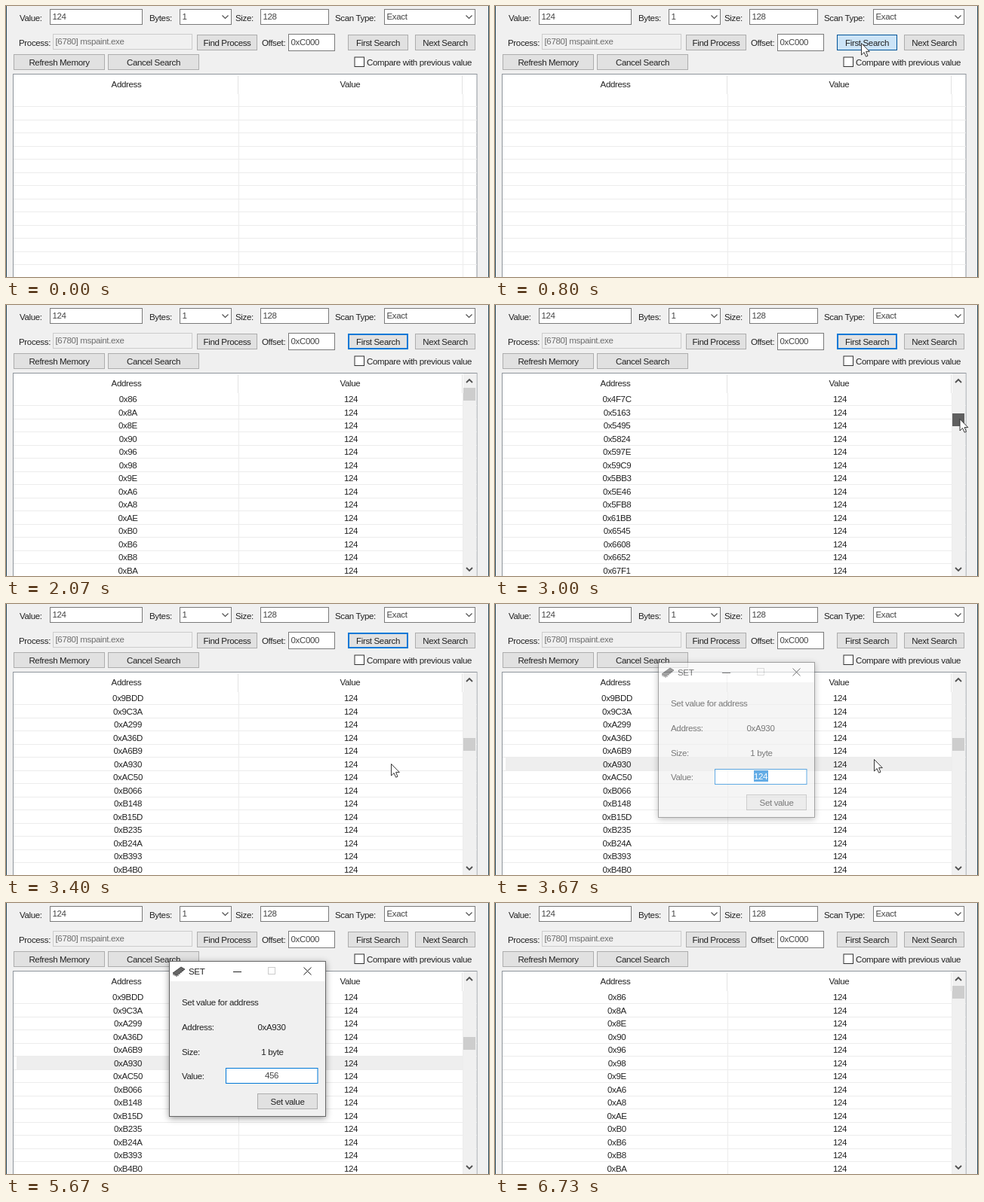
These frames come from a looping animation (640 by 360 pixels, 7.54 s). An HTML page:

```html
<!DOCTYPE html>
<html lang="en">
<head>
<meta charset="utf-8">
<title>Memory search</title>
<style>
html, body { margin: 0; width: 100%; height: 100%; overflow: hidden; background: #f0f0f0; }
svg { display: block; width: 640px; height: 360px; font: 11.5px "Liberation Sans", Arial, sans-serif; letter-spacing: -.34px; }
text { white-space: pre; }
.dialog { filter: drop-shadow(0 2px 4px #0006); }
</style>
</head>
<body>
<svg id="stage" viewBox="0 0 640 360"><g id="form"></g><g id="live"></g></svg>
<script>
const LOOP = 7540, TICK = 1000 / 15, ROW = 17.5, ROWS = 14;
const BLUE = '#0078d7', INK = '#222';
const TOP = '86 8A 8E 90 96 98 9E A6 A8 AE B0 B6 B8 BA'.split(' ');
const DEEP = '9BDD 9C3A A299 A36D A6B9 A930 AC50 B066 B148 B15D B235 B24A B393 B4B0'.split(' ');

// Pointer paths as [tick, x, y]; each path ends where the pointer disappears.
const PATHS = [
  [[6, 395, 340], [12, 485, 49], [16, 485, 49], [20, 499, 57], [23, 499, 57], [24, 515, 66], [25, 589, 92], [26, 640, 115]],
  [[33, 634, 165], [37, 618, 135], [40, 612, 117], [42, 612, 117], [48, 619, 185], [51, 510, 212], [54, 502, 206],
   [58, 502, 206], [63, 365, 216], [64, 361, 215], [66, 372, 216], [72, 372, 216]],
  [[94, 372, 216], [96, 410, 233], [98, 400, 239], [99, 400, 239], [100, 365, 316], [101, 355, 360]]
];

const rect = (x, y, w, h, fill, stroke = 'none', sw = 1) =>
  `<rect x="${x}" y="${y}" width="${w}" height="${h}" fill="${fill}" stroke="${stroke}" stroke-width="${sw}"/>`;
const path = (d, stroke, sw = 1, fill = 'none') =>
  `<path d="${d}" stroke="${stroke}" stroke-width="${sw}" fill="${fill}"/>`;
// Text is placed by its vertical middle.
const text = (s, x, y, fill = INK, anchor = 'start') =>
  `<text x="${x}" y="${y + 4}" fill="${fill}" text-anchor="${anchor}">${s}</text>`;
const mid = (s, x, y, fill) => text(s, x, y, fill, 'middle');
const field = (x, y, w, h, s, ink = '#444', fill = '#fff', line = '#7a7a7a') =>
  rect(x + .5, y + .5, w, h, fill, line) + text(s, x + 3.5, y + h / 2 - .5, ink);
const chevron = (x, y, dir = 1, sw = 1.2) => path(`M${x - 4} ${y - 2 * dir}l4 ${4 * dir}l4 ${-4 * dir}`, '#505050', sw);
const button = (x, y, w, s, fill = '#e1e1e1', line = '#adadad', sw = 1) =>
  rect(x + sw / 2, y + sw / 2, w - sw, 21 - sw, fill, line, sw) + mid(s, x + w / 2, y + 11);

function form() {
  let s = rect(0, 0, 640, 360, '#f0f0f0') + rect(0, 0, 1, 360, '#2a4a5c') + rect(639, 0, 1, 360, '#2a4a5c');
  s += text('Value:', 18, 16) + field(58, 4, 122, 20, '124');
  s += text('Bytes:', 190, 16) + field(230, 4, 68, 20, '1') + chevron(290.5, 14.5);
  s += text('Size:', 304, 16) + field(337, 4, 90, 20, '128');
  s += text('Scan Type:', 436, 16) + field(501, 4, 120, 20, 'Exact') + chevron(613.5, 14.5);
  s += text('Process:', 17, 49) + field(62, 37, 184, 20, '[6780] mspaint.exe', '#6d6d6d', '#f0f0f0', '#ccc');
  s += button(253, 38, 80, 'Find Process');
  s += text('Offset:', 339, 49) + field(374, 37, 61, 22, '0xC000');
  s += button(542, 38, 80, 'Next Search');
  s += button(10, 64, 121, 'Refresh Memory') + button(135, 64, 121, 'Cancel Search');
  s += rect(462, 68, 12.5, 12.5, '#fff', '#333') + text('Compare with previous value', 478, 75);
  s += rect(9.5, 90.5, 614.5, 280, '#fff', '#8f959c');
  s += mid('Address', 159.5, 104) + mid('Value', 456, 104);
  s += path('M307.5 92V117M604.5 92V117', '#e2e2e2');
  let lines = 'M308.5 117V360M605.5 117V360';
  for (let i = 1; i < ROWS; i++) lines += `M10 ${Math.floor(116 + i * ROW) + .5}H624`;
  return s + path(lines, '#ececec');
}

const dragAt = k => Math.min(1, Math.max(0, (k - 42) / 6));

function addresses(k) {
  const p = dragAt(k);
  if (k < 43 || k >= 86) return TOP;
  if (p === 1) return DEEP;
  let a = Math.round(0x86 + p * (0x9BDD - 0x86)), seed = k * 7919;
  return TOP.map(() => {
    seed = (seed * 1103 + 12345) % 65536;
    a += 12 + seed % 900;
    return a.toString(16).toUpperCase();
  });
}

function results(k) {
  let s = '';
  const active = k === 54;
  if (k >= 54 && k < 86) s += rect(14, 204, 591, 17, active ? BLUE : '#eee');
  addresses(k).forEach((a, i) => {
    const y = 125.3 + i * ROW, ink = active && i === 5 ? '#fff' : INK;
    s += mid('0x' + a, 161.5, y, ink) + mid('124', 457, y, ink);
  });
  const y = 110 + (k < 86 ? 68 * dragAt(k) : 0);
  const thumb = k >= 43 && k < 49 ? '#606060' : k >= 39 && k < 43 ? '#a6a6a6' : '#cdcdcd';
  return s + rect(606, 91, 17.5, 269, '#f0f0f0') + rect(606, y, 16, 17, thumb)
    + chevron(614, 101, -1, 1.8) + chevron(614, 351, 1, 1.8);
}

function firstSearch(k) {
  const x = 453, y = 38, label = 'First Search';
  if (k === 12) return button(x, y, 80, label, '#cce4f7', '#005499');
  if (k === 11 || k > 12 && k < 25) return button(x, y, 80, label, '#e5f1fb', BLUE);
  if (k >= 25 && k < 54) return button(x, y, 80, label, '#e1e1e1', BLUE, 2);
  return button(x, y, 80, label);
}

function dialog(k) {
  const typed = k < 72 ? '124' : k < 74 ? '4' : k < 77 ? '45' : '456';
  let s = rect(216.5, 77.5, 207, 206, '#f0f0f0', '#686868') + rect(217, 78, 206, 26, '#fff');
  s += path('M221 93l11 -8l5 3l-11 8z', '#333', .8, '#666');
  s += path('M222 94v2m2 -1v2m2 -1v2m2 -3v2m2 -4v2m2 -4v2m2 -4v2', '#444');
  s += text('SET', 242, 91) + path('M301 91.5H312', '#222');
  s += rect(347.5, 85.5, 9, 9, 'none', '#ccc') + path('M394.5 85.5l10 10m0 -10l-10 10', '#222');
  s += text('Set value for address', 233, 132);
  s += text('Address:', 233, 165) + mid('0xA930', 352, 165);
  s += text('Size:', 233, 198) + mid('1 byte', 353, 198);
  s += text('Value:', 233, 230) + rect(291.5, 219.5, 121.5, 20, '#fff', BLUE);
  if (k < 72) s += rect(343, 221, 19, 15, BLUE);
  s += mid(typed, 352, 229, k < 72 ? '#fff' : '#444') + button(333, 253, 80, 'Set value');
  return `<g class="dialog" opacity="${k === 55 ? .6 : 1}">${s}</g>`;
}

function pointer(k) {
  const keys = PATHS.find(p => k >= p[0][0] && k < p[p.length - 1][0]);
  if (!keys) return '';
  const i = keys.findIndex(p => p[0] > k), [t0, x0, y0] = keys[i - 1], [t1, x1, y1] = keys[i];
  const f = (k - t0) / (t1 - t0), x = x0 + (x1 - x0) * f, y = y0 + (y1 - y0) * f;
  return path(`M${x + .5} ${y + .5}v15.5l3.6 -3.4l2.5 5.6l2.4 -1l-2.4 -5.6h4.7z`, '#222', .9, '#fff');
}

const live = document.getElementById('live');
document.getElementById('form').innerHTML = form();
let last = -1;

function frame() {
  const k = Math.floor((performance.now() % LOOP + 4) / TICK);
  if (k !== last) {
    last = k;
    live.innerHTML = firstSearch(k) + (k >= 31 ? results(k) : '')
      + (k >= 55 && k < 86 ? dialog(k) : '') + pointer(k);
  }
  requestAnimationFrame(frame);
}
frame();
</script>
</body>
</html>
```
